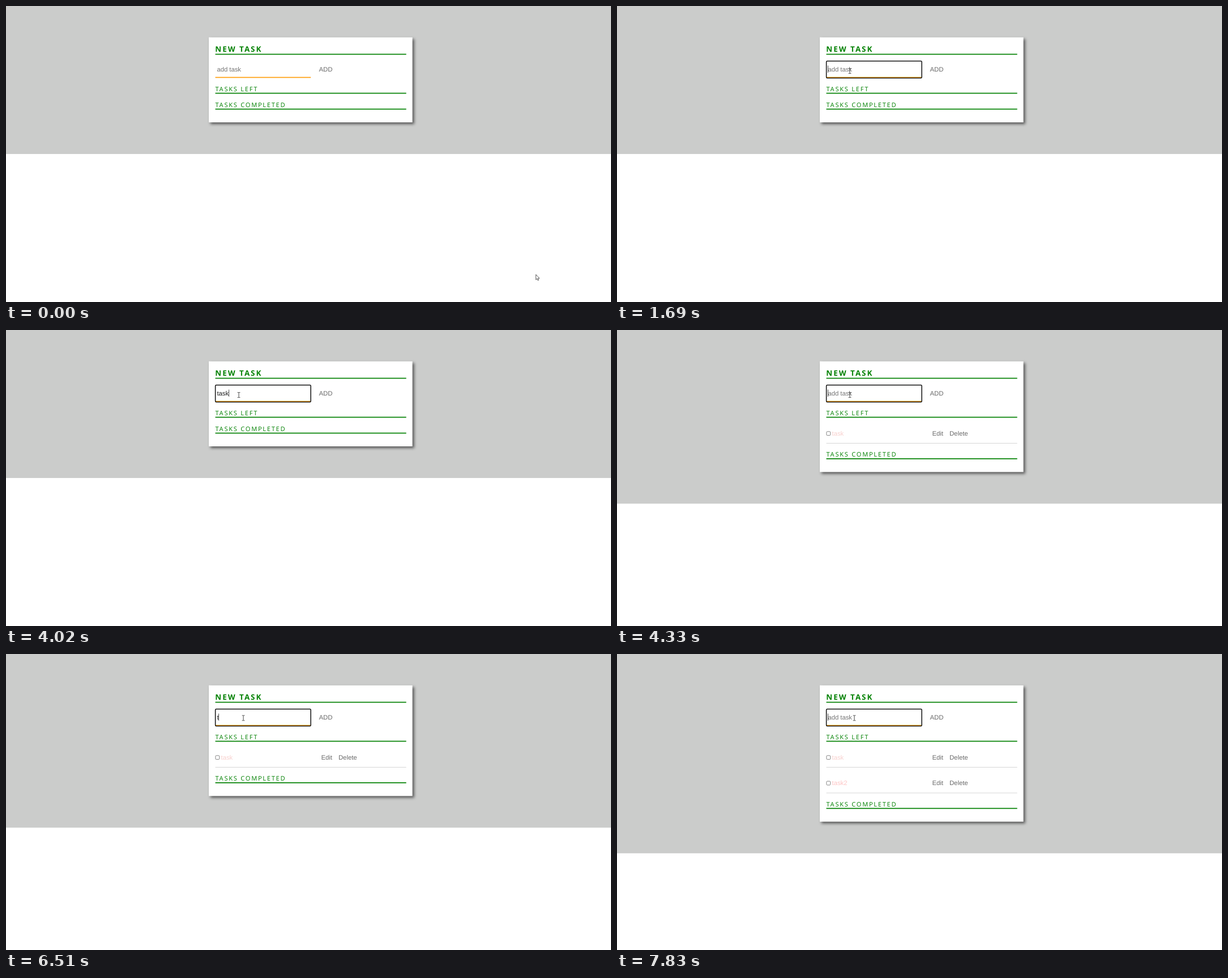
These frames come from a looping animation (1068 by 524 pixels, 8 s). An HTML page:

```html
<!DOCTYPE html>
<html lang="en">
<head>
<meta charset="utf-8">
<title>Task list</title>
<style>
  html, body { margin: 0; width: 100%; height: 100%; overflow: hidden; background: #fff; }
  svg { display: block; width: 1068px; height: 524px; }
  text { font: 11.25px "Liberation Sans", Arial, sans-serif; fill: #696969; text-rendering: geometricPrecision; white-space: pre; }
  .title { font: bold 13.3px "Open Sans", "Noto Sans", sans-serif; letter-spacing: 2.05px; fill: green; }
  .head { font: 11px "Open Sans", "Noto Sans", sans-serif; letter-spacing: 1.8px; fill: green; }
  .rule { fill: green; }
  #card { fill: #fff; filter: drop-shadow(3.5px 3.5px 2.5px #555); }
  #ring { fill: none; stroke: #101010; stroke-width: 1.5; }
  .box { fill: #fff; stroke: #767676; stroke-width: .9; }
  #arrow { fill: #fff; stroke: #333; stroke-width: .8; }
  #beam { fill: none; stroke: #333; stroke-width: .9; }
</style>
</head>
<body>
<svg viewBox="0 0 1068 524">
  <rect id="back" width="1068" fill="#cbcccb"/>
  <rect id="card" x="358" y="55.5" width="359.5"/>
  <text class="title" x="369.3" y="81.3">NEW TASK</text>
  <rect class="rule" x="369.5" y="84.6" width="337" height="1.7"/>

  <rect x="369.5" y="125.6" width="168.5" height="1.7" fill="#ff9f0f"/>
  <rect id="ring" x="369.6" y="97.6" width="168.4" height="29.8" rx="1.5"/>
  <text id="entry" x="372.4" y="115.6"></text>
  <rect id="caret" y="105.5" width="1" height="12.5" fill="#555"/>
  <text x="552.6" y="115.6">ADD</text>

  <text class="head" x="369.5" y="151">TASKS LEFT</text>
  <rect class="rule" x="369.5" y="153.6" width="337" height="1.7"/>
  <g id="items"></g>
  <g id="done">
    <text class="head" x="369.5" y="179">TASKS COMPLETED</text>
    <rect class="rule" x="369.5" y="181.7" width="337" height="1.7"/>
  </g>

  <path id="arrow" d="M.4 .4V9.6L2.5 7.6 3.9 10.8 5.3 10.2 4 7.1H6.8Z"/>
  <path id="beam" d="M-2.3-4.5H-.6L0-4 .6-4.5H2.3M0-4V4M-2.3 4.5H-.6L0 4 .6 4.5H2.3"/>
</svg>
<script>
const LOOP = 8000, ROW = 45.4;
const $ = id => document.getElementById(id);

// [time, typed text, caret visible]
const typing = [
  [0, "", 0], [610, "", 1], [1140, "", 0], [1690, "", 1], [2240, "", 0],
  [2320, "t", 1], [2470, "ta", 1], [2700, "tas", 1], [3250, "tas", 0],
  [3710, "ta", 1], [3870, "tas", 1], [4020, "task", 1],
  [4330, "", 1], [4880, "", 0], [5430, "", 1], [5960, "", 0],
  [6510, "t", 1], [6590, "ta", 1], [6890, "tas", 1], [6970, "task", 1],
  [7520, "task", 0], [7600, "task2", 1], [7830, "", 1]
];
const tasks = [
  { time: 4330, name: "task", color: "#f8d0cd" },
  { time: 7830, name: "task2", color: "#fec4c4" }
];

$("items").innerHTML = tasks.map((task, i) => `
  <g transform="translate(0 ${i * ROW})">
    <rect class="box" x="369.9" y="179.8" width="6.8" height="6.8" rx="1.4"/>
    <text x="379.5" y="187" style="fill:${task.color}">${task.name}</text>
    <text x="556.4" y="187">Edit</text>
    <text x="587" y="187">Delete</text>
    <rect x="369.5" y="200.2" width="337" height=".8" fill="#ccc"/>
  </g>`).join("");
const rows = [...$("items").children];

const show = (el, on) => el.style.display = on ? "" : "none";
const mix = (a, b, p) => a + (b - a) * p;

// progress of a pointer move that is sampled in discrete steps
const stepped = (t, start, gap, count) =>
  t < start ? 0 : Math.min(count, Math.floor((t - start) / gap) + 1) / count;

function pointer(t) {
  if (t < 840) {
    const p = stepped(t, 70, 77, 8), e = p * p * (3 - 2 * p);
    return [mix(935, 406, e), mix(475, 112, e)];
  }
  const p = stepped(t, 5100, 78.8, 10), swing = Math.sin(Math.PI * p);
  return [mix(411, 419, p) + 36 * swing, mix(115, 113.3, p) + 87 * swing];
}

function draw(t) {
  const count = tasks.filter(task => t >= task.time).length;
  $("back").setAttribute("height", 262 + count * ROW);
  $("card").setAttribute("height", 150.5 + count * ROW);
  $("done").setAttribute("transform", `translate(0 ${count * ROW})`);
  rows.forEach((row, i) => show(row, i < count));

  const [, typed, caret] = typing.findLast(entry => t >= entry[0]);
  const entry = $("entry");
  entry.textContent = typed || "add task";
  entry.style.fill = typed ? "#1c1c1c" : "#757575";
  const width = typed ? entry.getComputedTextLength() : 0;
  $("caret").setAttribute("x", Math.round(372.3 + width));
  show($("caret"), caret);
  show($("ring"), t >= 610);

  const [x, y] = pointer(t);
  const inField = x > 369 && x < 538 && y > 97 && y < 128;
  show($("beam"), inField);
  show($("arrow"), !inField);
  $(inField ? "beam" : "arrow").setAttribute("transform", `translate(${x} ${y})`);
}

let start;
function tick(now) {
  start ??= now;
  draw((now - start) % LOOP);
  requestAnimationFrame(tick);
}
draw(0);
requestAnimationFrame(tick);
</script>
</body>
</html>
```
